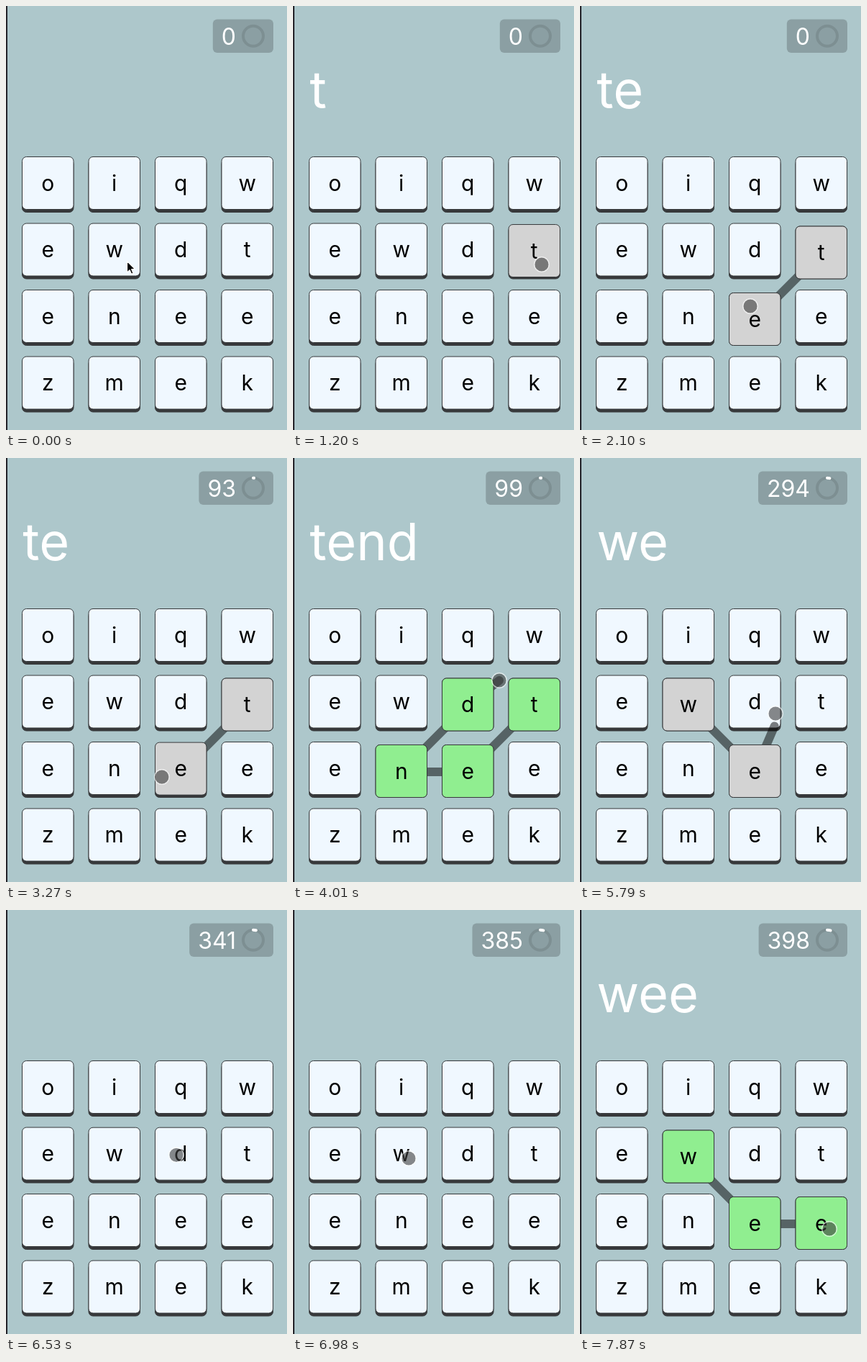
These frames come from a looping animation (391 px wide and 589 px high, 8000 ms). An HTML page:

```html
<!DOCTYPE html>
<html lang="en">
<head>
<meta charset="utf-8">
<title>Word grid</title>
<style>
html, body { margin: 0; width: 100%; height: 100%; overflow: hidden; background: #adc7cb; }
svg { display: block; width: 100vw; height: 100vh; }
text { font-family: Inter, sans-serif; }
</style>
</head>
<body>
<svg viewBox="0 0 391 589">
  <rect width="391" height="589" fill="#adc7cb"/>
  <rect width="2" height="589" fill="#25252c"/>
  <rect id="badge" y="18.5" height="46.5" rx="6" fill="#000" fill-opacity=".2"/>
  <text id="score" x="320" y="53.5" font-size="32" fill="#fff" text-anchor="end"></text>
  <circle cx="344" cy="41.7" r="14" fill="none" stroke="#000" stroke-opacity=".1" stroke-width="4"/>
  <path id="arc" fill="none" stroke="#fff" stroke-width="4" stroke-linecap="round"/>
  <text id="word" x="23.3" y="141.5" font-size="72" fill="#fff"></text>
  <g id="low"></g>
  <polyline id="link" fill="none" stroke="#000" stroke-opacity=".5" stroke-width="12" stroke-linecap="round" stroke-linejoin="round"/>
  <g id="high"></g>
  <path id="arrow" d="M0 0V15.6L3.6 12.3 6 17.8 8.6 16.7 6.2 11.2H11Z" fill="#000" stroke="#fff" stroke-width="1.2" stroke-linejoin="round"/>
  <g id="touch">
    <circle r="9.7" fill="#3c3c3c" fill-opacity=".6"/>
    <circle r="10.3" fill="none" stroke="#fff" stroke-opacity=".6" stroke-width="1.4"/>
  </g>
</svg>
<script>
const LOOP = 8000, STEP = LOOP / 54, LEAD = 8;
const PITCH = 92.5, LEFT = 22.5, TOP = 209.5, W = 71.5, H = 73, DEPTH = 4;
const REACH = 30, LAG = 40, PRESS = 150;
const DARK = '#37393b';
const LETTERS = 'oiqwewdteneezmek';
const VALID = ['ten', 'tend', 'wed', 'wee'];

// Key points of the pointer: time, x, y
const PATH = [
  [160, 168.5, 354.5], [890, 346, 359], [1400, 346, 359],
  [1850, 248, 410], [2082, 237, 417], [2230, 160, 430], [2400, 160, 430],
  [2900, 338, 345], [3050, 338, 345], [3267, 217, 443], [3560, 155, 432],
  [3940, 287, 309], [4200, 287, 309], [4590, 280, 300],
  [5040, 152, 352], [5180, 152, 352], [5480, 230, 425], [5660, 258, 418],
  [5786, 272, 355], [6000, 243, 340], [6420, 243, 340],
  [6971, 161, 345], [7140, 155, 347], [7430, 235, 430], [7720, 340, 443], [7860, 347, 443]
];
const STROKES = [
  { down: 1130, up: 2377, gain: 100 },
  { down: 2960, up: 4590, gain: 200 },
  { down: 5130, up: 6395, gain: 100 },
  { down: 7080, up: LOOP, gain: 0 }
];

const $ = id => document.getElementById(id);
const clamp = v => Math.max(0, Math.min(1, v));
const smooth = v => (v = clamp(v)) * v * (3 - 2 * v);

function add(parent, tag, attrs) {
  const el = document.createElementNS('http://www.w3.org/2000/svg', tag);
  for (const k in attrs) el.setAttribute(k, attrs[k]);
  return parent.appendChild(el);
}

const tiles = [...'oiqwewdteneezmek'].map((letter, i) => {
  const x = LEFT + i % 4 * PITCH, y = TOP + Math.floor(i / 4) * PITCH;
  const g = add($('low'), 'g', { transform: `translate(${x} ${y})` });
  const box = { width: W, height: H, rx: 6, stroke: DARK };
  add(g, 'rect', { ...box, y: DEPTH, fill: DARK });
  const top = add(g, 'g', {});
  const face = add(top, 'rect', box);
  add(top, 'text', { x: W / 2, y: 47.2, 'font-size': 30, 'text-anchor': 'middle' }).textContent = letter;
  return { x: x + W / 2, y: y + H / 2, g, top, face };
});

// Tangent at a key point; zero beside a rest
function slope(i, c) {
  const a = PATH[i - 1], p = PATH[i], b = PATH[i + 1];
  const still = q => q[1] === p[1] && q[2] === p[2];
  return !a || !b || still(a) || still(b) ? 0 : (b[c] - a[c]) / (b[0] - a[0]);
}

function pointer(t) {
  let i = 0;
  while (i < PATH.length - 2 && PATH[i + 1][0] <= t) i++;
  const a = PATH[i], b = PATH[i + 1], d = b[0] - a[0], u = clamp((t - a[0]) / d);
  return [1, 2].map(c => {
    const bend = u * (1 - u) * ((1 - u) * slope(i, c) - u * slope(i + 1, c));
    return a[c] + (b[c] - a[c]) * smooth(u) + d * bend;
  });
}

// A tile joins the stroke once the delayed pointer is near its middle
for (const s of STROKES) {
  s.touched = new Map();
  for (let t = s.down; t < s.up; t += 2) {
    const [x, y] = pointer(t - LAG);
    const i = tiles.findIndex(k => Math.hypot(k.x - x, k.y - y) < REACH);
    if (i >= 0 && !s.touched.has(i)) s.touched.set(i, t);
  }
}

function points(t) {
  return Math.floor(STROKES.reduce((sum, s) =>
    sum + s.gain * (1 - Math.exp(-Math.pow(Math.max(0, t - s.up) / 266, 0.85))), 0));
}

function drawScore(n) {
  $('score').textContent = n;
  const left = 308 - $('score').getComputedTextLength();
  $('badge').setAttribute('x', left);
  $('badge').setAttribute('width', 372 - left);
  const a = n / 7500 * 2 * Math.PI;
  $('arc').setAttribute('d', n
    ? `M344 27.7A14 14 0 0 1 ${344 + 14 * Math.sin(a)} ${41.7 - 14 * Math.cos(a)}` : '');
}

const pressed = (i, t) => Math.max(...STROKES.map(s => s.touched.has(i)
  ? smooth((t - s.touched.get(i)) / PRESS) * (1 - smooth((t - s.up) / PRESS)) : 0));

function draw(t) {
  const stroke = STROKES.find(s => t >= s.down && t < s.up);
  const held = stroke ? [...stroke.touched.keys()].filter(i => stroke.touched.get(i) <= t) : [];
  const word = held.map(i => LETTERS[i]).join('');
  const tint = VALID.includes(word) ? '#90ee90' : '#d3d3d3';

  $('word').textContent = word;
  drawScore(points(t));
  tiles.forEach((tile, i) => {
    const on = held.includes(i), layer = $(on ? 'high' : 'low');
    if (tile.g.parentNode !== layer) layer.appendChild(tile.g);
    tile.face.setAttribute('fill', on ? tint : '#f0f8ff');
    tile.top.setAttribute('transform', `translate(0 ${DEPTH * pressed(i, t)})`);
  });

  const line = held.map(i => [tiles[i].x, tiles[i].y + DEPTH + 1]);
  if (stroke) line.push(pointer(t - LAG));
  $('link').setAttribute('points', line.join(' '));

  const touching = t >= STROKES[0].down;
  $('arrow').style.display = touching ? 'none' : '';
  $('touch').style.display = touching ? '' : 'none';
  $(touching ? 'touch' : 'arrow').setAttribute('transform', `translate(${pointer(t)})`);
}

// The motion is sampled and held, like a low-rate screen recording
const start = performance.now();
function tick() {
  const t = (performance.now() - start) % LOOP;
  draw(Math.max(0, Math.floor((t - LEAD) / STEP) * STEP + LEAD));
  requestAnimationFrame(tick);
}
tick();
</script>
</body>
</html>
```
